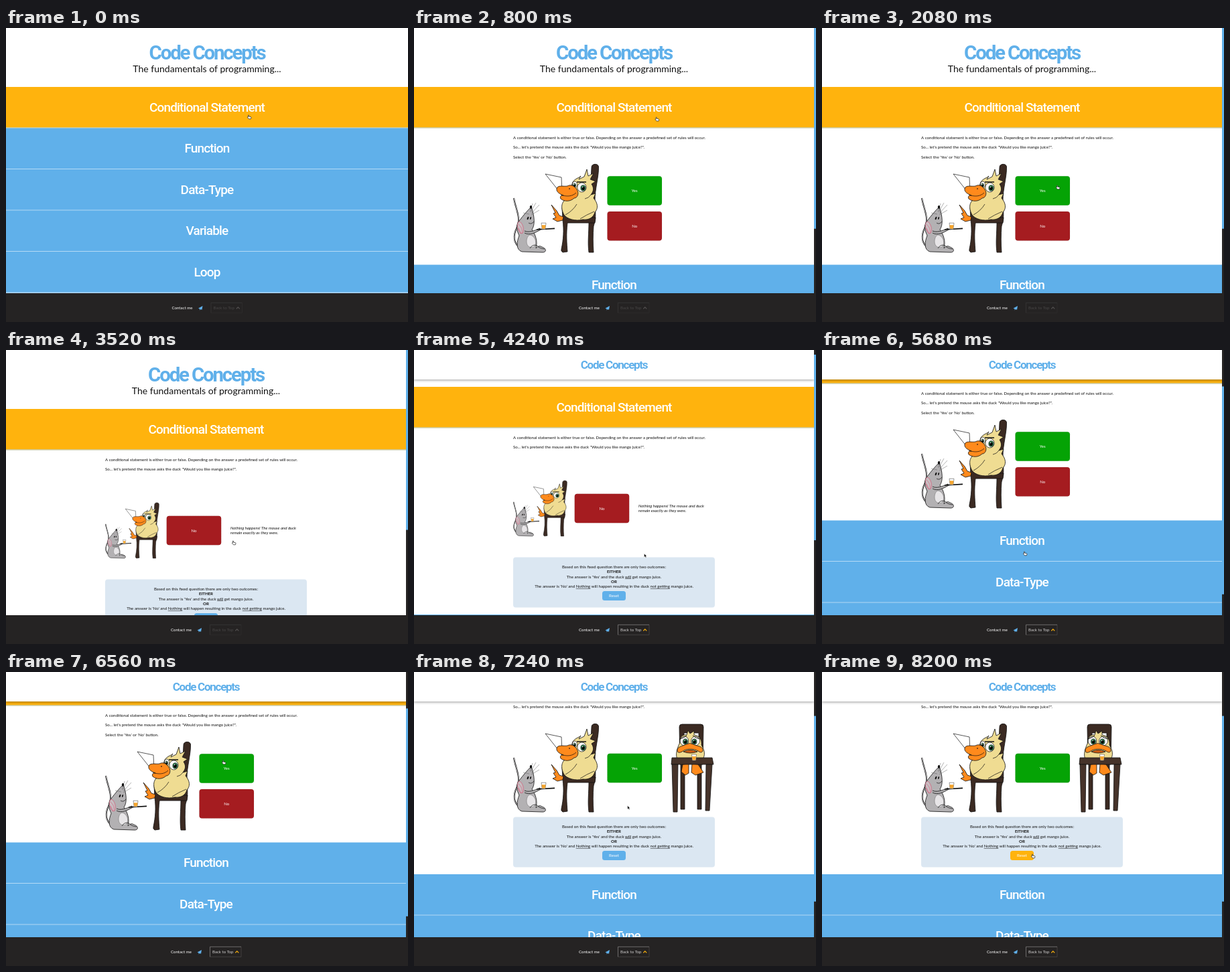
An HTML page with a canvas for the animation above (8240 ms loop, 600x439 px).

```html
<!DOCTYPE html>
<html lang="en">
<head>
<meta charset="utf-8">
<title>Code Concepts</title>
<style>
html, body { margin: 0; width: 100%; height: 100%; overflow: hidden; background: #fff; }
canvas { display: block; width: 600px; height: 439px; }
</style>
</head>
<body>
<canvas id="stage" width="600" height="439"></canvas>
<script>
const ctx = document.getElementById('stage').getContext('2d');
const LOOP = 8240, VIEW_H = 439, FOOT_Y = 396, BAR = 61.5, TOP = 88, SHRINK = 22;
const BLUE = '#60b0ea', AMBER = '#ffb30d', DARK = '#252323', GREEN = '#05a305', RED = '#a51c20';
const WOOD = '#3b2a22', DOWN = '#efdc92', ORANGE = '#ff8a1c', GREY = '#b3b1b3', INK = '#111';
const HEAD = 'Roboto, "Open Sans", sans-serif', BODY = 'Lato, "Open Sans", sans-serif';
const TOPICS = ['Function', 'Data-Type', 'Variable', 'Loop'];

// moments of the visit
const OPEN = 240, PICK_NO = 2840, RESET = 5640, PICK_YES = 6640;
const SCROLL = [[3640, 0], [4160, 11], [4300, 11], [4960, 77]];
const CURSOR_X = [[700, 363], [1600, 352], [2160, 352], [2560, 340], [3560, 340], [3900, 345],
  [4860, 345], [5280, 303], [5760, 303], [6400, 325], [6800, 325], [7700, 315]];
const CURSOR_Y = [[700, 133], [1600, 238], [2160, 238], [2560, 288], [3560, 288], [3900, 307],
  [4860, 307], [5280, 304], [5760, 304], [6400, 135], [6800, 135], [7700, 275]];
const ARROW = [[900, 1400], [3640, 5180], [5860, 6280], [6960, 7600]];

const clamp = v => Math.max(0, Math.min(1, v));
const ease = v => 0.5 - Math.cos(clamp(v) * Math.PI) / 2;
const mix = (a, b, p) => a + (b - a) * p;

function track(keys, t) {
  if (t <= keys[0][0]) return keys[0][1];
  for (let i = 1; i < keys.length; i++) {
    const [t0, a] = keys[i - 1], [t1, b] = keys[i];
    if (t < t1) return mix(a, b, ease((t - t0) / (t1 - t0)));
  }
  return keys[keys.length - 1][1];
}

function rect(x, y, w, h, fill) {
  ctx.fillStyle = fill;
  ctx.fillRect(x, y, w, h);
}

function round(x, y, w, h, r, fill) {
  ctx.beginPath();
  ctx.roundRect(x, y, w, h, r);
  ctx.fillStyle = fill;
  ctx.fill();
}

function text(str, x, y, font, fill, align = 'center') {
  ctx.font = font;
  ctx.fillStyle = fill;
  ctx.textAlign = align;
  ctx.textBaseline = 'alphabetic';
  ctx.fillText(str, x, y);
}

function heading(str, x, y, size, fill, weight = 500, tight = 0.045) {
  ctx.letterSpacing = `${-tight * size}px`;
  text(str, x, y + size * 0.36, `${weight} ${size}px ${HEAD}`, fill);
  ctx.letterSpacing = '0px';
}

const body = (str, x, y, align = 'left', fill = INK, style = '400') =>
  text(str, x, y + 2, `${style} 6.1px ${BODY}`, fill, align);

// words between underscores are underlined
function marked(str, cx, y) {
  ctx.font = `400 6.1px ${BODY}`;
  const parts = str.split('_');
  let x = cx - ctx.measureText(parts.join('')).width / 2;
  parts.forEach((part, i) => {
    body(part, x, y);
    const w = ctx.measureText(part).width;
    if (i % 2) rect(x, y + 2.8, w, 0.5, INK);
    x += w;
  });
}

function shape(d, fill, line = INK, width = 0.8) {
  const p = new Path2D(d);
  if (fill) { ctx.fillStyle = fill; ctx.fill(p); }
  if (line) { ctx.strokeStyle = line; ctx.lineWidth = width; ctx.stroke(p); }
}

function oval(x, y, rx, ry, fill, line = INK, tilt = 0) {
  ctx.beginPath();
  ctx.ellipse(x, y, rx, ry, tilt, 0, 7);
  ctx.fillStyle = fill;
  ctx.fill();
  if (line) { ctx.strokeStyle = line; ctx.lineWidth = 0.7; ctx.stroke(); }
}

function glass(x, y) {
  shape(`M${x - 3.5} ${y - 9}h7l-1 9h-5z`, '#fff', '#555', 0.6);
  shape(`M${x - 3} ${y - 6}h6l-.8 5.6h-4.4z`, '#f6a52d', null);
}

function eye(x, y, rx, ry, look) {
  oval(x, y, rx, ry, '#fff');
  oval(x + look, y + 1, rx * 0.55, ry * 0.6, '#3c9a63');
  oval(x + look, y + 1.2, rx * 0.35, ry * 0.4, '#000', null);
  oval(x + look - 0.8, y - 0.4, 0.7, 0.8, '#fff', null);
}

function mouse() {
  const tail = 'M149 254C151 268 160 283 154 297C148 309 147 320 158 328';
  shape(tail, null, INK, 2);
  shape(tail, null, GREY, 1);
  shape('M175 267C169 273 163 280 157 288C151 294 154 304 157 310C153 320 152 331 161 334L192 335C198 335 198 329 191 327C187 324 184 327 182 329C185 318 181 308 176 301C181 294 180 281 175 267Z', GREY);
  shape('M173 309C180 310 184 319 180 326C174 330 168 326 168 319C168 314 170 310 173 309Z', '#e7e5e7', '#777', 0.6);
  oval(159, 298, 4, 9, '#c6bfc2', '#d65878', -0.25);
  shape('M156 293Q163 299 161 307M156 299Q159 304 159 307', null, '#d65878', 0.6);
  shape('M165 303C171 306 179 303 188 299L189 301C181 306 172 310 165 306', GREY);
  shape('M173 329Q177 322 184 325Q186 329 195 330', null, INK, 0.7);
  shape('M174 275L182 261M175 277L187 264M175 279L187 272M173 274L177 262M172 278L163 276', null, '#555', 0.45);
  oval(174.5, 267.5, 1.7, 2.4, INK, null);
  oval(170, 284, 1.1, 2.4, INK, null, 0.4);
  oval(174, 284, 0.9, 2, INK, null, 0.3);
  shape('M171 291Q175 294 179 289', null, INK, 0.7);
  shape('M183 301L210 299.4', null, INK, 1.7);
  glass(193.5, 300.2);
}

function diner() {
  shape('M265 208C265 202 275 202 275.5 207C276 222 270 240 270 258C271 278 272 284 268 296C267 308 267 322 268 335L261 335C259 321 261 306 261 290C267 271 259 246 264 227Z', WOOD);
  shape('M221 268L226 270L228 283L271 283L270 291L229 291C227 308 228 321 229 334L222 335Q219 333 220 330C223 316 224 302 222 287Z', WOOD);
  shape('M196 218L220 223L221 246L215 242Z', '#fff', INK, 0.7);
  shape('M205 264L213 273L217 280L223 282L222 287L214 289L207 285L212 283L208 277L211 276Z', ORANGE);
  shape('M237 230C240 225 246 224 249 221L246 226L254 222L258 211L260 221L268 217L263 226L271 229L265 233C269 239 268 244 264 249L271 247L268 254C275 262 275 270 270 275C268 283 261 287 252 286C241 289 228 285 224 279C220 272 219 263 224 258C231 251 233 240 237 230Z', DOWN);
  shape('M226 279Q237 273 243 263M248 285Q257 279 269 274M264 249Q261 254 255 255', null, INK, 0.7);
  eye(240, 234, 3.6, 5, -0.5);
  eye(250.5, 238, 6.6, 7, 2);
  shape('M243 230L257 230', null, INK, 1.3);
  shape('M213 240C214 234 224 237 229 236C234 233 240 236 243 241C247 247 244 254 239 254C234 259 225 260 219 255C217 252 220 249 223 250C218 248 212 245 213 240Z', ORANGE);
  shape('M219 249C227 252 236 252 242 246', null, INK, 0.7);
  oval(232, 240, 1, 0.7, INK, null);
}

function guest() {
  shape('M396 208Q396 204 400 204L428 204Q432 204 432 208L431 264L425 264L425 217L403 217L403 264L397 264Z', WOOD);
  shape('M398 260h6v71h-6ZM423 260h6v71h-6Z', WOOD);
  shape('M397 231C396 222 402 219 407 220L409 213L412 218L418 214L418 220C426 221 430 227 429 235C436 246 434 254 428 260L396 260C389 254 391 243 397 231Z', DOWN);
  eye(403.5, 229, 6.4, 6.8, 1.5);
  eye(420, 229, 6.4, 6.8, -1.5);
  shape('M396 226Q402 225 407 221M427 226Q421 225 416 221', null, INK, 1);
  shape('M393 244C392 237 401 237 406 234Q412 231 417 234C422 237 432 236 431 244Q429 248 424 244C417 240 406 240 400 245Q394 248 393 244Z', ORANGE);
  shape('M402 245Q412 240 423 245Q412 249 402 245Z', '#cf5d13');
  shape('M401 264L410 263L410 277L405 280L399 275ZM415 263L424 264L432 276L420 280L414 276Z', ORANGE);
  shape('M385 254L445 254L447 264L384 264Z', '#46332a');
  shape('M385 264h9l-1 71h-6ZM436 264h9l-4 69h-6Z', '#46332a');
  glass(418, 258);
}

function couple(scale) {
  ctx.save();
  ctx.translate(148, 270);
  ctx.scale(scale, scale);
  ctx.translate(-148, -270);
  diner();
  mouse();
  ctx.restore();
}

function choice(label, x, y, fill) {
  round(x, y, 81.5, 43.5, 4, fill);
  ctx.setLineDash([1.2, 1.2]);
  ctx.strokeStyle = 'rgba(0,0,0,.2)';
  ctx.lineWidth = 0.6;
  ctx.stroke();
  ctx.setLineDash([]);
  body(label, x + 40.7, y + 22, 'center', '#fff');
}

function outcome(hover) {
  const cx = 298.5;
  round(148, 342.5, 301, 75, 4, '#dbe7f2');
  body('Based on this fixed question there are only two outcomes:', cx, 357, 'center');
  body('EITHER', cx, 364.3, 'center', INK, '700');
  marked("The answer is 'Yes' and the duck _will_ get mango juice.", cx, 371.6);
  body('OR', cx, 378.9, 'center', INK, '700');
  marked("The answer is 'No' and _Nothing_ will happen resulting in the duck _not getting_ mango juice.", cx, 386.2);
  round(281, 393, 35, 14, 3.5, hover ? AMBER : BLUE);
  body('Reset', cx, 400.3, 'center', '#fff');
}

function lesson(answer, hover) {
  body('A conditional statement is either true or false. Depending on the answer a predefined set of rules will occur.', 148, 163.5);
  body('So... let\'s pretend the mouse asks the duck "Would you like mango juice?".', 148, 178);
  couple(answer === 'no' ? 0.63 : 1);
  if (!answer) {
    body("Select the 'Yes' or 'No' button.", 148, 192.5);
    choice('Yes', 288.5, 221.3, GREEN);
    choice('No', 288.5, 274, RED);
    return;
  }
  if (answer === 'no') {
    choice('No', 239.7, 247.8, RED);
    body('Nothing happens! The mouse and duck', 335, 266, 'left', INK, 'italic 400');
    body('remain exactly as they were.', 335, 273.3, 'left', INK, 'italic 400');
  } else {
    choice('Yes', 288.5, 247.8, GREEN);
    guest();
  }
  outcome(hover);
}

function bar(name, top, w, fill) {
  rect(0, top, w, BAR, fill);
  rect(0, top + BAR - 1, w, 1, '#b4daf5');
  heading(name, w / 2, top + 30, 19, '#fff');
}

function header(w, p) {
  const h = mix(TOP, 44, p);
  ctx.save();
  if (p > 0) {
    ctx.shadowColor = `rgba(0,0,0,${0.4 * p})`;
    ctx.shadowBlur = 4;
    ctx.shadowOffsetY = 0.5;
  }
  rect(0, 0, w, h, '#fff');
  ctx.restore();
  heading('Code Concepts', w / 2, mix(36, 22, p), mix(29.5, 17, p), BLUE, 700, 0.075);
  ctx.globalAlpha = clamp(1 - p * 2);
  text('The fundamentals of programming...', w / 2, 66, `400 14px ${BODY}`, INK);
  ctx.globalAlpha = 1;
}

function footer(w, lit) {
  const x = w / 2;
  rect(0, FOOT_Y, 600, VIEW_H - FOOT_Y, DARK);
  body('Contact me', x - 52.5, 418, 'left', '#fff');
  shape(`M${x - 13} 418.5l6.5 -3.5l-1 5.8l-2 -.8l-1.3 1.4l-.1 -2z`, BLUE, null);
  shape(`M${x + 52.5} 410.3v15h-46.5`, null, lit ? '#4e4c4c' : '#302e2e', 0.7);
  shape(`M${x + 6} 425.3v-15h46.5`, null, lit ? '#8c8a8a' : '#3c3a3a', 0.7);
  body('Back to Top', x + 9.5, 418, 'left', lit ? '#d2d0d0' : '#484646');
  shape(`M${x + 43.8} 419.3l2.5 -2.5l2.5 2.5`, null, lit ? AMBER : '#555252', 1.2);
}

function cursor(x, y, arrow) {
  ctx.save();
  ctx.translate(x, y);
  ctx.lineJoin = 'round';
  if (arrow) shape('M-1.5 -3v5.4l1.3 -1.1l1 2l1 -.5l-1 -1.9h1.6z', '#000', '#fff', 0.5);
  else shape('M-1.5 -2.8q.7 -.7 1.2 .3v1.7l2.6 .5q.9 .3 .7 1.2l-.6 1.9h-3l-2 -2.4q-.2 -.9 1.1 -.4z', '#fff', '#222', 0.7);
  ctx.restore();
}

function draw(t) {
  const answer = t < PICK_NO ? '' : t < RESET ? 'no' : t < PICK_YES ? '' : 'yes';
  const slide = ease((t - OPEN) / 400);
  const compact = ease((t - 3760) / 360);
  const room = slide * (answer ? 278.5 : 204);
  const docH = TOP + BAR * 5 + room + VIEW_H - FOOT_Y + 0.5 - SHRINK * compact;
  const scroll = track(SCROLL, t) + (answer === 'yes' ? 27 : 0);
  const lift = scroll + SHRINK * compact;
  const w = slide > 0 ? 597 : 600;
  const x = track(CURSOR_X, t), y = track(CURSOR_Y, t);
  const overReset = x > 281 && x < 318 && y + lift > 393 && y + lift < 408;

  rect(0, 0, 600, VIEW_H, '#fff');
  ctx.save();
  ctx.translate(0, -lift);
  bar('Conditional Statement', TOP, w, AMBER);
  if (slide > 0) {
    ctx.save();
    ctx.beginPath();
    ctx.rect(0, TOP + BAR, w, room);
    ctx.clip();
    lesson(answer, overReset);
    ctx.restore();
  }
  TOPICS.forEach((name, i) => bar(name, TOP + BAR * (i + 1) + room, w, BLUE));
  ctx.restore();

  header(w, compact);
  footer(w, scroll > 2);
  if (w < 600) {
    rect(w, 0, 3, VIEW_H, DARK);
    rect(w, scroll * VIEW_H / docH, 3, VIEW_H * VIEW_H / docH, BLUE);
  }
  cursor(x, y, ARROW.some(([a, b]) => t > a && t < b));
}

let start;
function frame(now) {
  start ??= now;
  draw((now - start) % LOOP);
  requestAnimationFrame(frame);
}
requestAnimationFrame(frame);
</script>
</body>
</html>
```
